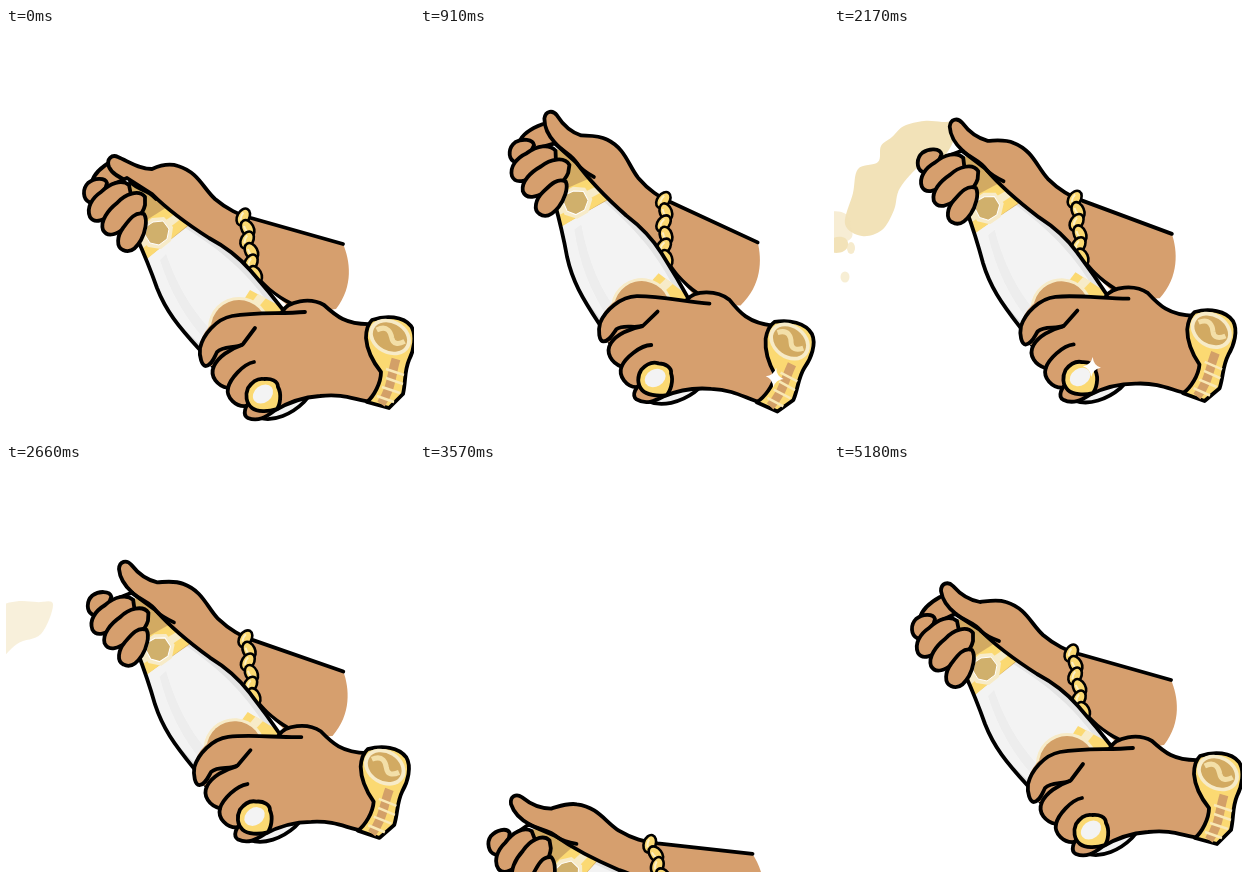
These frames come from a looping animation (408x408 px, 5.25 s). An HTML page:

```html
<!DOCTYPE html>
<html lang="en">
<head>
<meta charset="utf-8">
<title>Champagne pop</title>
<style>
  html, body { margin: 0; width: 100%; height: 100%; overflow: hidden; background: #fff; }
  svg { display: block; width: 100vw; height: 100vh; }
  .line { fill: none; stroke: #000; stroke-width: 3.8; stroke-linecap: round; stroke-linejoin: round; }
  .skin { fill: #d69f6e; }
  .gold { fill: #fbd972; }
  .tan { fill: #d2aa62; }
  .pale { fill: #f7ebc8; }
  .glass { fill: #f3f3f3; }
  .thin { stroke-width: 2.6; }
  .white { fill: #fff; }
</style>
</head>
<body>
<svg viewBox="0 0 408 408">
  <defs>
    <path id="body" d="M104 158L121 150L146 166C162 182 178 194 203 210C218 218 232 228 244 242C258 258 278 280 303 318C312 335 312 360 298 374C286 386 268 394 254 390C236 376 212 345 194 322C172 298 160 283 151 260C144 240 140 230 130 208Z"/>
    <clipPath id="inside"><use href="#body"/></clipPath>
  </defs>

  <g id="spray" fill="#f2e2b8">
    <path id="jet"/>
    <g id="drops">
      <path d="M-5 184C8 181 18 187 16 197C24 214 12 216 -5 211Z" opacity=".6"/>
      <path d="M-5 212C5 206 15 209 14 217C13 225 3 226 -5 224Z"/>
      <ellipse cx="17" cy="220" rx="4" ry="6" opacity=".7"/>
      <ellipse cx="11" cy="249" rx="4.5" ry="5.5" opacity=".6"/>
    </g>
  </g>

  <g id="scene">
    <g id="index">
      <path class="skin" d="M85 158C87 147 96 138 112 130L126 154L112 164L90 168Z"/>
      <path class="line" d="M86 154C88 145 97 138 106 133"/>
    </g>

    <!-- upper arm -->
    <path id="armFill" class="skin"/>
    <path id="armLine" class="line"/>
    <path class="line" d="M248 246C258 257 266 266 286 276"/>
    <path class="white" d="M250 253L280 276L276 284Z"/>
    <g id="chain" class="gold"></g>

    <!-- bottle -->
    <use href="#body" class="glass"/>
    <g clip-path="url(#inside)">
      <path fill="#e1e1e1" d="M130 208C142 250 158 285 196 318L190 330L140 260Z"/>
      <path fill="#e4e4e4" d="M178 190C215 215 245 238 278 284L270 286C242 244 215 222 176 198Z"/>
      <path fill="#ededed" d="M160 226C172 260 190 290 212 308L203 316C180 292 164 264 154 232Z"/>
      <path class="tan" d="M100 150L146 160L182 198L140 231L126 205Z"/>
      <path class="gold" d="M128 200L166 176L182 197L141 231Z"/>
      <path class="pale" d="M133 210L172 184L176 190L137 220Z"/>
      <path class="gold" d="M244 262L285 284L262 300L226 290Z"/>
      <path class="pale" d="M252 266L260 270L242 292L234 290Z"/>
      <circle class="pale" cx="233" cy="300" r="31"/>
      <circle cx="233" cy="300" r="28" fill="#d3a068"/>
    </g>
    <path d="M146 190L158 189L167 199L165 213L155 221L142 219L135 209L137 197Z" class="pale"/>
    <path d="M147 194L157 193L163 201L161 211L153 217L144 215L139 207L141 198Z" fill="#d0b06c" stroke="#fff" stroke-width="1"/>
    <use href="#body" class="line"/>
    <path id="crease" class="line"/>

    <!-- upper fingers -->
    <g class="line">
      <path class="skin" d="M101 155C99 149 88 150 82 155C76 161 77 171 83 174C88 177 94 173 97 168Z"/>
      <path class="skin" d="M123 157C116 151 104 155 95 164C86 170 80 180 84 189C89 197 99 191 106 186C114 181 123 176 125 167Z"/>
      <path class="skin" d="M139 169C133 161 119 166 111 175C102 182 94 193 97 202C102 211 112 205 119 200C128 196 137 186 139 177Z"/>
      <path class="skin" d="M138 186C129 183 123 192 117 200C111 208 110 219 117 222C125 226 131 219 135 212C139 205 142 192 138 186Z"/>
    </g>

    <!-- lower hand -->
    <path class="skin" d="M199 338C192 330 191 313 202 300C211 288 226 287 275 284C280 273 304 269 318 277C330 288 340 296 366 296L376 342L368 374C350 373 340 365 314 368C298 370 280 374 262 388C252 394 239 393 239 379C228 378 220 370 222 360C211 358 204 348 208 338Z"/>
    <g class="line">
      <path d="M276 284C282 273 304 269 318 277C330 288 340 297 366 296"/>
      <path d="M299 284C274 286 250 284 226 288C210 291 197 307 194 320C193 329 196 338 200 338C206 337 208 330 211 324C218 317 229 321 237 316L249 300"/>
      <path d="M236 317C224 321 212 329 208 338C203 349 212 358 222 360"/>
      <path d="M248 334C237 336 224 351 222 360C220 370 230 379 240 378"/>
      <path d="M246 372C239 377 236 387 242 390C252 394 260 389 268 383C284 373 299 369 314 368C340 365 350 373 368 374"/>
    </g>

    <!-- ring -->
    <path class="line gold" style="fill:#fbd972" d="M242 360C246 354 252 350 258 351C265 350 272 353 272 359C276 366 274 377 271 381C262 384 251 384 246 380C240 375 239 367 242 360Z"/>
    <ellipse fill="#f3f3f3" cx="257" cy="366" rx="11" ry="8.5" transform="rotate(-38 257 366)"/>

    <!-- watch -->
    <path class="line" style="fill:#fbd972" d="M360 310C360 302 362 296 366 292C380 287 397 288 405 298C411 307 408 322 403 332C398 344 400 353 397 366L383 380L361 374C368 368 375 355 375 344C367 334 361 323 360 310Z"/>
    <path d="M390 331C385 347 386 360 375 376" fill="none" stroke="#d3a068" stroke-width="9"/>
    <path d="M380 341L398 347M380 350L397 356M376 359L394 365M371 368L388 374" fill="none" stroke="#f9e8b5" stroke-width="2.5"/>
    <g transform="rotate(28 384 309)">
      <ellipse class="pale" cx="384" cy="309" rx="22" ry="17"/>
      <ellipse class="tan" cx="384" cy="309" rx="18" ry="13.5"/>
      <path d="M369 309C376 299 383 305 386 309C390 314 395 312 399 306" fill="none" stroke="#f3dfa8" stroke-width="5"/>
    </g>

    <path id="spark" class="white" d="M0 -10Q1.5 -1.5 9 0Q1.5 1.5 0 10Q-1.5 1.5 -9 0Q-1.5 -1.5 0 -10Z"/>
  </g>
</svg>
<script>
const LOOP = 5250, STEP = 70;
const $ = id => document.getElementById(id);
const clamp = x => Math.max(0, Math.min(1, x));
const mix = (a, b, k) => a + (b - a) * k;
const show = (el, on) => el.setAttribute('visibility', on ? 'visible' : 'hidden');

// Blend two paths that share the same commands.
function mixPath(a, b, k) {
  const nums = b.match(/[\d.]+/g);
  let i = 0;
  return a.replace(/[\d.]+/g, n => mix(+n, +nums[i++], k).toFixed(2));
}

const thumbDown = 'M124 154C114 150 106 146 103 139C100 131 106 126 112 129C122 133 132 141 146 141';
const thumbUp = 'M122 150C113 143 108 134 107 127C107 119 114 117 119 122C126 130 134 136 146 138';
const armTop = 'C155 137 163 135 172 138C192 144 197 160 209 171C222 182 232 186 245 190L337 216';
const armEnd = 'C344 232 348 258 330 281L290 286L250 252L145 166Z';
const creaseDown = 'M124 154C130 160 138 162 143 165C146 167 148 169 150 171';
const creaseUp = 'M122 150C132 158 140 158 147 167C152 172 157 174 165 177';

// time, ring x, ring y, turn
const poses = [
  [0, 257, 367, 0], [560, 245, 358, 5.1], [910, 235, 351, 9], [980, 235, 351, 9],
  [1120, 241, 365, 6.8], [1260, 239, 354, 7.5], [1400, 239, 350, 7.6],
  [2170, 246, 350, 4.6], [3150, 251, 357, 2.2]
];

function poseAt(t) {
  if (t >= 4620) return poses[0].slice(1);
  const i = poses.findIndex(p => p[0] > t);
  if (i < 0) return poses[poses.length - 1].slice(1);
  const a = poses[i - 1], b = poses[i], k = (t - a[0]) / (b[0] - a[0]);
  return [1, 2, 3].map(n => mix(a[n], b[n], k));
}

// 0 = in place, 1 = just below the stage
function sinkAt(t) {
  if (t >= 4620) return Math.pow(1 - clamp((t - 4620) / 560), 2);
  return t > 3150 ? 0.34 * Math.pow((t - 3150) / 210, 1.3) : 0;
}

const burst = [[122,98],[105,72],[85,57],[62,47],[38,45],[43,28],[22,13],[14,-8],
  [-20,-10],[-20,95],[2,94],[16,101],[36,97],[48,107],[72,107],[98,124]];
const pour = [[124,96],[108,94],[90,93],[70,98],[58,109],[47,118],[44,134],[24,141],
  [19,165],[11,196],[28,208],[48,202],[60,182],[66,160],[88,136],[112,126]];

function smooth(pts) {
  const n = pts.length, at = i => pts[(i + n) % n];
  let d = 'M' + pts[0];
  for (let i = 0; i < n; i++) {
    const [a, b, c, e] = [at(i - 1), at(i), at(i + 1), at(i + 2)];
    const h1 = [0, 1].map(j => b[j] + (c[j] - a[j]) / 6);
    const h2 = [0, 1].map(j => c[j] - (e[j] - b[j]) / 6);
    d += `C${h1} ${h2} ${c}`;
  }
  return d + 'Z';
}

function drawSpray(t) {
  const on = t >= 980 && t < 2870;
  show($('spray'), on);
  show($('drops'), on && t >= 2030);
  if (!on) return;
  const grow = clamp((t - 910) / 210);
  const fall = clamp((t - 1680) / 490);
  const leave = clamp((t - 2170) / 700);
  const wave = (t - 1400) / 110 * (1 - fall);
  const pts = burst.map((p, i) => {
    const edge = i > 1 && i < 14 ? 1 : 0;
    const wob = edge * 5 * (Math.sin(wave + i * 1.7) - Math.sin(i * 1.7));
    return [mix(116, mix(p[0], pour[i][0], fall) + wob, grow),
            mix(112, mix(p[1], pour[i][1], fall) + wob * .7, grow)];
  });
  $('jet').setAttribute('d', smooth(pts));
  $('spray').setAttribute('transform', `translate(${-110 * leave} ${90 * leave * leave})`);
  $('spray').setAttribute('opacity', 1 - leave * leave);
}

// peak time, x, y
const sparks = [[910, 375, 347], [1400, 233, 205], [2170, 268, 355], [3150, 376, 348]];

function drawSpark(t) {
  const s = sparks.find(p => Math.abs(t - p[0]) < 210);
  show($('spark'), !!s);
  if (!s) return;
  const size = Math.cos((t - s[0]) / 210 * Math.PI / 2);
  $('spark').setAttribute('transform', `translate(${s[1]} ${s[2]}) scale(${size})`);
}

function draw(t) {
  const out = t >= 3710 && t < 4620;
  $('scene').style.display = out ? 'none' : '';
  const [x, y, turn] = poseAt(t), sink = sinkAt(t);
  $('scene').setAttribute('transform',
    `translate(${x + 33 * sink} ${y + 233 * sink}) rotate(${turn - 14 * sink}) translate(-257 -367)`);
  const lift = clamp(t / 280);
  const top = mixPath(thumbDown, thumbUp, lift) + armTop;
  $('armLine').setAttribute('d', top);
  $('armFill').setAttribute('d', top + armEnd);
  $('crease').setAttribute('d', mixPath(creaseDown, creaseUp, lift));
  show($('index'), t < 980 || t >= 4620);
  drawSpray(t);
  drawSpark(t);
}

// bracelet links
let links = '';
for (let i = 0; i < 6; i++) {
  const side = i % 2 ? 1 : -1, cx = 238.5 + i * 1.9 + side * 1.2, cy = 189 + i * 11.5;
  links += `<g transform="translate(${cx} ${cy}) rotate(${side * -28})">
    <ellipse rx="6" ry="9" stroke="#000" stroke-width="2.6"/>
    <path d="M-2 -4Q-3 0 -1 4" fill="none" stroke="#fdf0c4" stroke-width="2"/></g>`;
}
$('chain').innerHTML = links;

const start = performance.now();
function tick() {
  const t = (performance.now() - start) % LOOP;
  draw(Math.floor(t / STEP) * STEP);
  requestAnimationFrame(tick);
}
tick();
</script>
</body>
</html>
```
